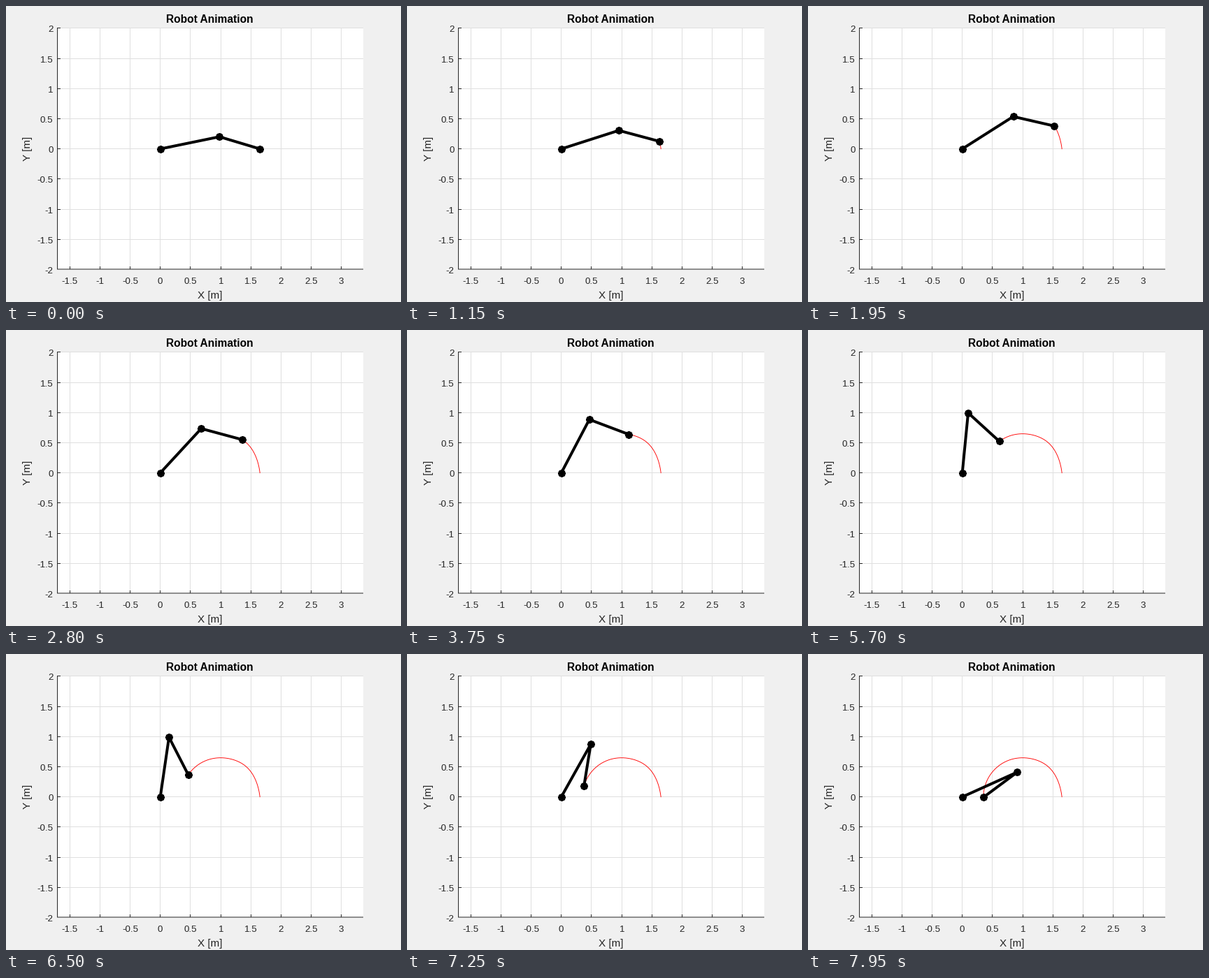
A matplotlib script that plays this animation: 565 by 424 pixels, repeating every 8 s.

```python
import numpy as np
import matplotlib.pyplot as plt
from matplotlib.animation import FuncAnimation
from matplotlib.patches import Rectangle

W, H, DPI = 565, 424, 100
PX = 72 / DPI                          # one pixel in points
X0, Y0, UNIT = 220.7, 204.68, 86.36    # pixel place of the base, pixels per metre
LEFT, RIGHT, TOP, BOTTOM = 73, 511, 31, 377
L1, L2, RADIUS = 1.0, 0.7, 0.65
INK, GRID = "#262626", "#dfdfdf"
STEPS, HOLD = 150, 9


def to_px(p):
    p = np.asarray(p, float)
    return X0 + UNIT * p[..., 0], Y0 - UNIT * p[..., 1]


def polar(r, a):
    return np.column_stack([r * np.cos(a), r * np.sin(a)])


def joint_angles(p):
    """Elbow-up angles of the two links that put the tip at p."""
    d2 = (p**2).sum(axis=1)
    base = np.arctan2(p[:, 1], p[:, 0])
    q1 = base + np.arccos((L1**2 + d2 - L2**2) / (2 * L1 * np.sqrt(d2)))
    q2 = -np.arccos((d2 - L1**2 - L2**2) / (2 * L1 * L2))
    return q1, q2


# The tip follows a circle; the first joint starts at rest and catches up
t = np.arange(STEPS + 1)
speed = 2 * np.pi / 299
q1, q2 = joint_angles([1, 0] + polar(RADIUS, speed * t))
start_rate = speed * RADIUS / (1 + RADIUS)
damp, freq = 0.052, 0.1
q1 = q1 - start_rate * np.exp(-damp * t) * np.sin(freq * t) / freq
elbow = polar(L1, q1)
tip = elbow + polar(L2, q1 + q2)

fig = plt.figure(figsize=(W / DPI, H / DPI), dpi=DPI, facecolor="#f0f0f0")
ax = fig.add_axes([0, 0, 1, 1])
ax.set_xlim(0, W)
ax.set_ylim(H, 0)
ax.axis("off")
ax.add_patch(Rectangle((LEFT, TOP), RIGHT - LEFT, BOTTOM - TOP, fc="white", lw=0))


def rule(x, y, color, z):
    ax.plot(x, y, color=color, lw=PX, zorder=z, solid_capstyle="butt", snap=False)


def label(x, y, text, size, **kw):
    kw = {"ha": "center", "va": "baseline", "color": INK, **kw}
    ax.text(x, y, text, fontsize=size * PX, family="Liberation Sans", **kw)


def pixel_centre(v):
    return np.round(v - 0.5) + 0.5


for v in np.arange(-1.5, 3.01, 0.5):
    x = pixel_centre(X0 + UNIT * v)
    rule([x, x], [TOP, BOTTOM], GRID, 1)
    rule([x, x], [BOTTOM - 4, BOTTOM], INK, 2)
    label(x, 397.5, f"{v:g}", 13.33)
for v in np.arange(-2, 2.01, 0.5):
    y = pixel_centre(Y0 - UNIT * v)
    if v > -2:
        rule([LEFT, RIGHT], [y, y], GRID, 1)
        rule([LEFT, LEFT + 5], [y, y], INK, 2)
    label(67.5, y + 5.5, f"{v:g}", 13.33, ha="right")
rule([LEFT + 0.5] * 2, [TOP, BOTTOM], INK, 2)
rule([LEFT, RIGHT], [BOTTOM] * 2, INK, 2)

label(291.5, 24, "Robot Animation", 15.5, weight="bold", color="black")
label(292, 419, "X [m]", 15.2)
label(37.5, 204, "Y [m]", 15.2, rotation=90, ha="right", va="center")

trace, = ax.plot([], [], color="red", lw=0.9 * PX, zorder=3, snap=False)
arm, = ax.plot([], [], color="black", lw=4 * PX, zorder=4, marker=(8, 2, 0),
               ms=10.6 * PX, mew=3.2 * PX, snap=False)


def draw(i):
    k = max(0, i - HOLD)
    trace.set_data(*to_px(tip[:k + 1]))
    arm.set_data(*to_px([(0, 0), elbow[k], tip[k]]))
    return trace, arm


anim = FuncAnimation(fig, draw, frames=STEPS + HOLD + 1, interval=50,
                     init_func=lambda: draw(0), repeat=True, repeat_delay=0)
plt.show()
```
